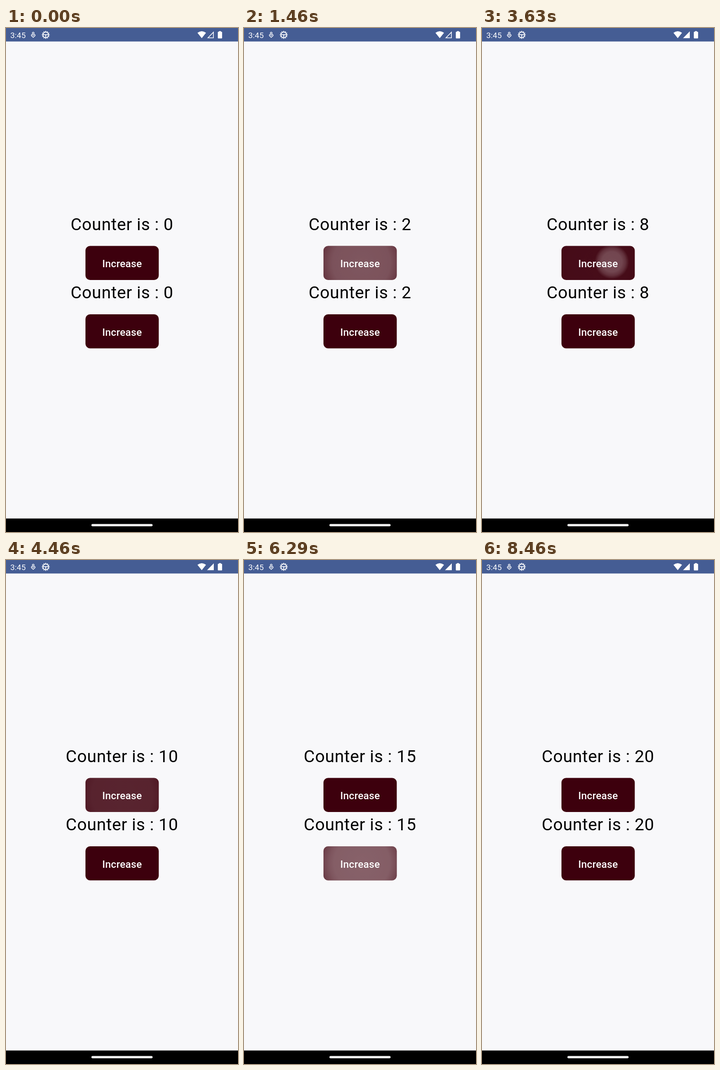
Animation of 508 by 1102 pixels, one loop 8.5 s. Source, as an HTML page with a canvas:

```html
<!DOCTYPE html>
<html lang="en">
<head>
<meta charset="utf-8">
<title>Counter</title>
<style>
  html, body { margin: 0; width: 100%; height: 100%; overflow: hidden; background: #f8f8fa; }
  canvas { display: block; width: 508px; height: 1102px; }
</style>
</head>
<body>
<canvas id="stage" width="508" height="1102"></canvas>
<script>
const ctx = document.getElementById('stage').getContext('2d');
const LOOP = 8500;
const ENTER = 450, EXIT = 375, HOLD = 110;
const SIGNAL_ON = 1790;

const panels = [
  { textY: 442, y: 476.5, touch: [299, 510],
    taps: [810, 1160, 1480, 1760, 2040, 2330, 2610, 2880, 3565, 3850] },
  { textY: 591, y: 626, touch: [297, 655],
    taps: [4740, 5155, 5450, 5730, 6010, 6290, 6570, 6900, 7220, 7540] }
];
const BTN = { x: 174, w: 160.5, h: 74.5, r: 10 };

const clamp = v => Math.min(1, Math.max(0, v));
const mix = (a, b, p) => a + (b - a) * p;

function label(str, x, y, size, { weight = 400, spacing = 0, color = '#000', align = 'center' } = {}) {
  ctx.font = `${weight} ${size}px Roboto, sans-serif`;
  ctx.letterSpacing = spacing + 'px';
  ctx.textAlign = align;
  ctx.fillStyle = color;
  ctx.fillText(str, x, y);
}

function rounded(x, y, w, h, r) {
  ctx.beginPath();
  ctx.roundRect(x, y, w, h, r);
}

function poly(...pts) {
  ctx.beginPath();
  pts.forEach(([x, y]) => ctx.lineTo(x, y));
  ctx.closePath();
}

function line(x1, y1, x2, y2) {
  ctx.beginPath();
  ctx.moveTo(x1, y1);
  ctx.lineTo(x2, y2);
  ctx.stroke();
}

function statusBar(t) {
  ctx.fillStyle = '#455d94';
  ctx.fillRect(0, 0, 508, 29.5);
  label('3:45', 9.5, 21.5, 17.3, { color: '#fff', align: 'left', spacing: 0.1 });
  ctx.fillStyle = ctx.strokeStyle = '#fff';

  // Small figure
  ctx.lineWidth = 1.4;
  ctx.beginPath();
  ctx.arc(59.6, 11, 1.9, 0, 7);
  ctx.stroke();
  ctx.beginPath();
  ctx.moveTo(59.6, 20.5);
  ctx.lineTo(55.6, 16.8);
  ctx.quadraticCurveTo(55, 14, 57.3, 14.3);
  ctx.lineTo(59.6, 16.4);
  ctx.lineTo(61.9, 14.3);
  ctx.quadraticCurveTo(64.2, 14, 63.6, 16.8);
  ctx.closePath();
  ctx.stroke();

  // Gear
  ctx.lineWidth = 1.7;
  ctx.beginPath();
  ctx.arc(87, 15, 6.2, 0, 7);
  ctx.stroke();
  for (let i = 0; i < 12; i++) {
    const a = i * Math.PI / 6, c = Math.cos(a), s = Math.sin(a);
    line(87 + c * 6.5, 15 + s * 6.5, 87 + c * 8.7, 15 + s * 8.7);
  }
  line(81, 14.5, 93, 14.5);
  line(87, 14.5, 87, 21);

  // Wi-Fi
  ctx.beginPath();
  ctx.moveTo(428.6, 22.3);
  ctx.lineTo(419.2, 10.6);
  ctx.quadraticCurveTo(428.6, 3.2, 438, 10.6);
  ctx.closePath();
  ctx.fill();

  // Signal
  if (t < SIGNAL_ON) {
    ctx.lineWidth = 1.5;
    poly([442.2, 21.4], [454.2, 21.4], [454.2, 9.2]);
    ctx.stroke();
  } else {
    poly([440.2, 22.2], [455, 22.2], [455, 7.2]);
    ctx.fill();
  }

  // Battery
  ctx.fillRect(466.4, 6.8, 4.2, 2.5);
  rounded(463.8, 8.2, 9.4, 14.6, 1.2);
  ctx.fill();
}

function ripple(age, panel) {
  if (age < 0 || age > ENTER + EXIT) return;
  const grow = 1 - Math.pow(1 - clamp(age / ENTER), 2.5);
  const alpha = 0.25 * clamp(age / 40) * clamp((ENTER + EXIT - age) / EXIT);
  const x = mix(panel.touch[0], BTN.x + BTN.w / 2, grow);
  const y = mix(panel.touch[1], panel.y + BTN.h / 2, grow);
  const r = Math.max(1, 115 * grow);
  const fill = ctx.createRadialGradient(x, y, 0, x, y, r);
  fill.addColorStop(0, `rgba(255,255,255,${alpha})`);
  fill.addColorStop(0.58, `rgba(255,255,255,${alpha * 0.95})`);
  fill.addColorStop(0.8, `rgba(255,255,255,${alpha * 0.6})`);
  fill.addColorStop(1, 'rgba(255,255,255,0)');
  ctx.fillStyle = fill;
  ctx.fillRect(BTN.x, panel.y, BTN.w, BTN.h);
}

function drawPanel(panel, count, t) {
  label('Counter is : ' + count, 254, panel.textY, 37.1, { spacing: 0.62 });
  ctx.save();
  rounded(BTN.x, panel.y, BTN.w, BTN.h, BTN.r);
  ctx.fillStyle = '#3d000d';
  ctx.fill();
  ctx.clip();
  panel.taps.forEach(tap => ripple(t - tap, panel));
  ctx.restore();
  label('Increase', 254.2, panel.y + 46.5, 22.25, { weight: 500, spacing: 0.2, color: '#fff' });
}

function draw(t) {
  ctx.fillStyle = '#f8f8fa';
  ctx.fillRect(0, 0, 508, 1102);
  statusBar(t);
  const count = panels.flatMap(p => p.taps).filter(tap => t >= tap + HOLD).length;
  panels.forEach(p => drawPanel(p, count, t));
  ctx.fillStyle = '#000';
  ctx.fillRect(0, 1072.5, 508, 29.5);
  rounded(187, 1084.4, 134, 5, 2.5);
  ctx.fillStyle = '#f4f4f4';
  ctx.fill();
}

const start = performance.now();
function tick() {
  draw((performance.now() - start) % LOOP);
  requestAnimationFrame(tick);
}
tick();
</script>
</body>
</html>
```
